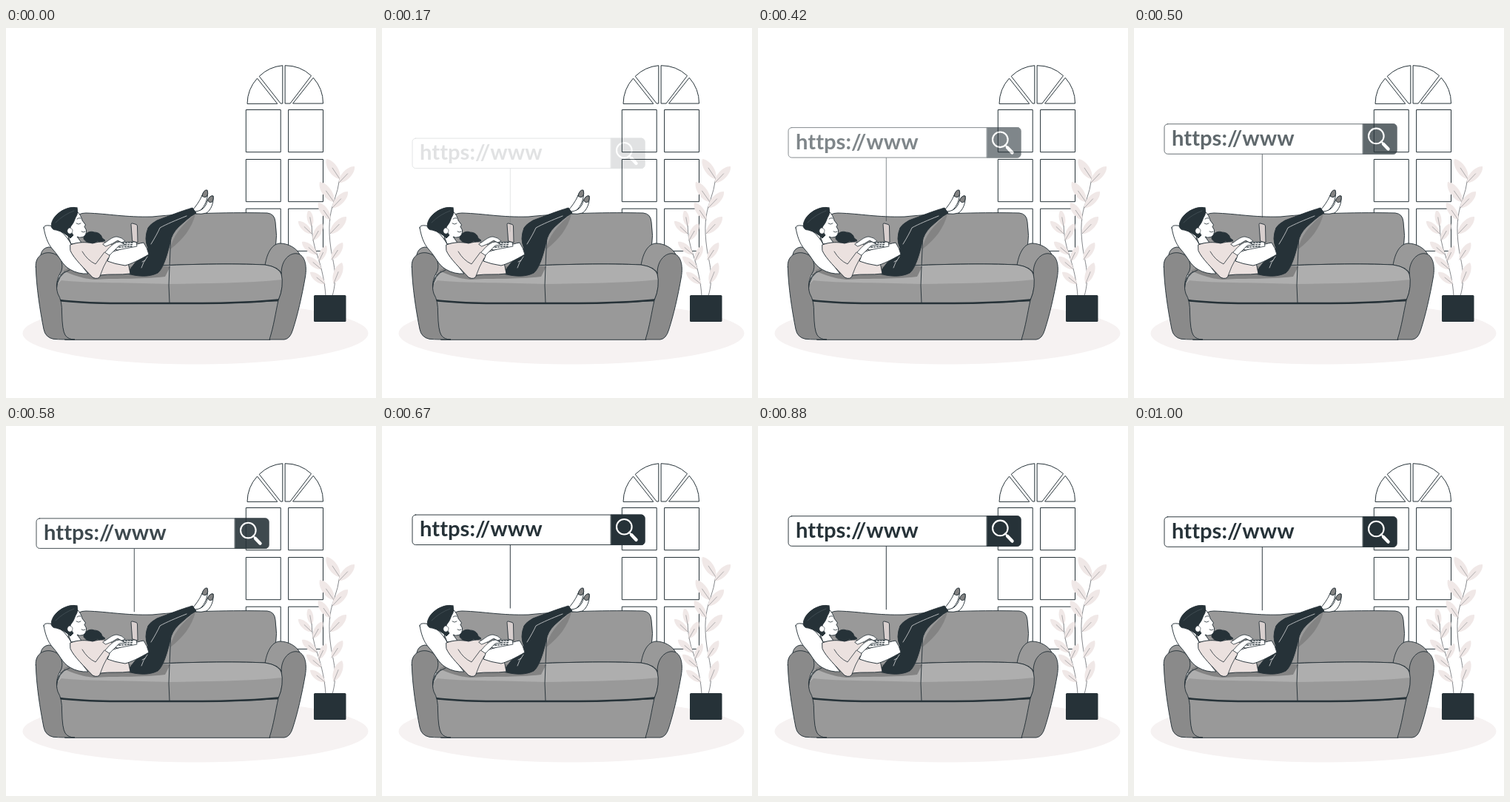
Write an HTML page with a canvas that moves like this. It is 500x500 px and loops after 1.04 s.

```html
<!DOCTYPE html>
<html lang="en">
<head>
<meta charset="utf-8">
<title>Browsing on the sofa</title>
<style>
  html, body { margin: 0; width: 100%; height: 100%; overflow: hidden; background: #fff; }
  canvas { position: absolute; left: 0; top: 0; width: 500px; height: 500px; }
</style>
</head>
<body>
<canvas id="room" width="500" height="500"></canvas>
<canvas id="bar" width="500" height="500"></canvas>
<script>
const INK = '#263238', PINK = '#ebe1df', WHITE = '#fff';
const GREY = '#999', SHADE = '#8a8a8a', LIGHT = '#aeaeae', SHADOW = '#838383';
const room = document.getElementById('room').getContext('2d');
const barCanvas = document.getElementById('bar');
const bar = barCanvas.getContext('2d');

function shape(c, d, fill, line = INK, width = 0.95) {
  const path = new Path2D(d);
  c.lineJoin = c.lineCap = 'round';
  if (fill) { c.fillStyle = fill; c.fill(path); }
  if (line) { c.strokeStyle = line; c.lineWidth = width; c.stroke(path); }
}
const draw = (...args) => shape(room, ...args);
const stroke = (d, color, width) => shape(room, d, null, color, width);

function drawFloor() {
  draw('M22.500,412.500a233.500,42 0 1 0 467,0a233.500,42 0 1 0 -467,0Z', '#f6f2f2', null);
}

function drawWindow() {
  const panes = [
    'M326,102A51.500,51.500 0 0 1 339.500,68L366.500,102Z',
    'M342.500,65A51.500,51.500 0 0 1 373.800,50.700V102H371.500Z',
    'M377.500,50.700A51.500,51.500 0 0 1 412.500,64.500L384,102H377.500Z',
    'M415.500,67.500A51.500,51.500 0 0 1 428.500,102H388Z'
  ];
  panes.forEach(d => draw(d, WHITE, INK, 1));
  for (const y of [110.5, 177.5, 244.2])
    for (const x of [324.7, 382]) draw(`M${x},${y}h46.500v57.200h-46.500Z`, WHITE, INK, 1);
}

function leaf(tx, ty, bx, by, w = 0.25) {
  const dx = bx - tx, dy = by - ty;
  const side = s => {
    const ax = tx + dx * 0.2 - dy * w * s, ay = ty + dy * 0.2 + dx * w * s;
    const cx = tx + dx * 0.8 - dy * w * s, cy = ty + dy * 0.8 + dx * w * s;
    return [ax, ay, cx, cy];
  };
  const [a, b, c, d] = side(1), [e, f, g, h] = side(-1);
  draw(`M${tx},${ty}C${a},${b} ${c},${d} ${bx},${by}C${g},${h} ${e},${f} ${tx},${ty}Z`, '#f0e8e7', null);
  stroke(`M${tx + dx * 0.45},${ty + dy * 0.45}L${bx},${by}`, '#77797d', 0.55);
}

function drawPlant() {
  stroke('M441,362C449,335 442,318 439,298C435,270 437,252 443,235Q449,218 451,203', '#66696e', 0.8);
  stroke('M432,362C431,345 427,326 421,308Q413,287 413,264', '#66696e', 0.8);
  [[433, 177, 451, 204], [471, 187, 450, 209], [424, 208, 443, 235], [462, 221, 441, 243],
   [422, 236, 438, 259], [460, 255, 438, 278], [455, 290, 440, 313], [454, 317, 443, 345]]
    .forEach(p => leaf(...p));
  [[409, 246, 413, 268], [395, 261, 413, 278], [428, 264, 415, 287], [400, 289, 420, 306],
   [433, 294, 423, 315], [406, 309, 426, 326], [411, 330, 431, 346]]
    .forEach(p => leaf(...p));
  room.fillStyle = INK;
  room.beginPath();
  room.roundRect(416, 361, 43.5, 36, 1.5);
  room.fill();
}

function drawSofa() {
  // back rest
  draw('M70,330L92,258Q97,250 108,250C140,251 160,256 198,255C245,250 310,249 353,250Q363,251 364,262Q367,280 364,300L350,323H220Z', GREY);
  draw('M222,299C225,281 237,267 256,251C252,270 238,287 222,299Z', SHADOW, null);
  stroke('M223,274Q222,300 221,322');
  // arm tops
  draw('M47,306Q49,297 58,296Q82,300 84,329L74,334Z', GREY);
  draw('M350,321C352,307 358,292 370,291C382,291 393,298 397,306L372,332Z', GREY);
  // base
  draw('M70,369H370L357,421.300H80Z', GREY);
  // seat
  draw('M68,356C67,340 75,329 86,327L190,322C240,319 310,318 350,320Q368,323 373,333Q376,350 368,368C320,373 265,372 221,372C170,373 110,373 73,368Q68,364 68,356Z', GREY);
  draw('M69,347Q73,331 86,327L190,322C240,319 310,318 350,320Q371,323 373,340C325,345 270,345 221,346C175,344 108,345 75,341Z', LIGHT, null);
  draw('M77,328C96,336 103,338 119,340C142,338 179,340 215,336L222,322H90Z', SHADOW, null);
  stroke('M86,327Q69,332 68,355M190,322C240,319 310,318 350,320Q371,323 373,334');
  stroke('M221,322L220,348L221,372');
  stroke('M73,368C110,373 170,372 221,372C270,372 325,372 368,367.500', INK, 2.6);
  // arm fronts
  draw('M40.300,323C39,309 50,302 61,304C73,306 78,317 75,328C68,340 67,349 70,359Q76,369 75.500,385Q76,409 80,415Q84,421 93,421C82,421 72,421 64,420.300Q53,418 51,407C46,382 41,350 40.300,323Z', SHADE);
  draw('M372,331C372,313 384,303 394,305C404,307 407,321 404.500,336C400,362 394,388 387.500,408Q384,420 376,421H356C362,402 364,386 368,368Q376,350 372,331Z', SHADE);
}

function drawHead() {
  draw('M105,285C104,279 113,273 119,276C126,276 129,280 130,284L134,287Q129,290 123,288Q119,293 110,290Z', INK);
  draw('M95,247C100,251 102,256 103,260L107.500,266L106,268.500L108.500,273Q109,280 104,282.500Q99,284 96,282L102,290L88,292L82,276Z', WHITE);
  draw('M96,243C85,240 70,248 64,258C59,267 61,273 68,273Q79,276 87,284L91,280Q86,275 87,269Q92,263 94,256Q98,251 96,243Z', INK);
  draw('M84,271Q81,275 85,278Q90,279 90,273Q87,268 84,271Z', WHITE, INK, 0.6);
  stroke('M95,264Q98,266.500 101,264M96,258Q98,256 101,257M102,275Q104.500,277 107,275', INK, 0.8);
  stroke('M67,263Q78,252 92,247', '#59656b', 0.5);
}

function drawLegs() {
  draw('M253,245C259,238 263,231 265,226Q268,218 272,220C274,227 270,238 265,244L258,251Z', WHITE);
  draw('M265,227Q267,218 272,219Q274,224 271,228Q268,230 265,227Z', SHADOW);
  draw('M256,248C266,247 270,241 272,234Q275,226 280,227C281,236 277,246 271,250Q264,252 257,251Z', WHITE);
  draw('M272.500,233Q275,226 280,227Q281,231 278.500,235Q275,237 272.500,233Z', SHADOW);
  draw('M164,332C171,320 184,306 192,298Q186,285 192,270Q195,265 204,260C220,254 238,247 252,243L257,250C248,255 241,262 233,269Q224,278 222,289C218,307 212,326 205,331C193,337 179,336 164,332Z', INK);
  stroke('M244,254C229,260 217,265 208,270Q204,279 196,292', '#d8dadb', 0.8);
  stroke('M191,309Q185,317 183,324M188,314L184,316', '#d8dadb', 0.8);
}

function drawBody() {
  draw('M87,293C97,289 108,289 117,291C127,288 137,288 143,293L165,317L168,332C154,334 140,332 128,334Q125,341 117,337C107,326 91,311 87,301Z', PINK);
  draw('M141,303C157,299 174,292 186,290Q191,297 193,306C181,313 169,319 161,321Q147,319 137,315Q140,309 141,303Z', WHITE);
  stroke('M138,311Q131,323 127,335M103,302Q110,314 121,319L133,303', INK, 0.8);
}

function drawLaptop() {
  draw('M144,297L151,289L176,289L177,295L151,300Z', WHITE, INK, 0.8);
  for (let row = 0; row < 3; row++)
    for (let key = 0; key < 6; key++) {
      const x = 150 + key * 3.8 - row * 0.5, y = 291 + row * 2.6 - key * 0.2;
      stroke(`M${x},${y}h2`, INK, 1.3);
    }
  draw('M169,265Q169,263.500 171,264L176,265.500Q177.500,266 177.500,268L178,290L171,288Z', '#d8cfce', INK, 0.9);
  draw('M131,292C138,288 143,282 150,282Q157,283 161,288L156,290L151,287Q144,292 135,295Z', WHITE, INK, 0.8);
  draw('M134,303Q146,288 154,289L161,293L153,294L140,307Z', WHITE, INK, 0.8);
}

function drawWoman() {
  draw('M51,270Q51,266 59,267C72,270 82,281 88,292C94,306 101,321 111,332Q98,333 86,326C75,319 74,311 63,299C56,291 53,281 51,270Z', WHITE);
  drawLegs();
  drawHead();
  drawBody();
  drawLaptop();
}

function fitFont(c, text, width) {
  const face = size => `700 ${size}px Lato, "Open Sans", sans-serif`;
  c.letterSpacing = '0.02px'; // any spacing turns ligatures off
  c.font = face(100);
  c.font = face(100 * width / c.measureText(text).width);
}

function drawBar(y) {
  const c = bar, text = 'https://www';
  const rightEnd = 'H350.500a4.500,4.500 0 0 1 4.500,4.500V36a4.500,4.500 0 0 1 -4.500,4.500';
  c.clearRect(0, 0, 500, 500);
  c.save();
  c.translate(0, y);
  shape(c, 'M173.300,40V126', null);
  shape(c, `M45.500,0${rightEnd}H45.500a4.500,4.500 0 0 1 -4.500,-4.500V4.500a4.500,4.500 0 0 1 4.500,-4.500Z`, WHITE);
  shape(c, `M309.500,0${rightEnd}H309.500Z`, INK);
  shape(c, 'M317,16.200a10.300,10.300 0 1 0 20.600,0a10.300,10.300 0 1 0 -20.600,0Z', null, WHITE, 2.1);
  shape(c, 'M334,23.500L337,26.800', null, WHITE, 2);
  shape(c, 'M337,27L343.500,33.800', null, WHITE, 4.4);
  c.fillStyle = INK;
  fitFont(c, text, 165.5);
  c.fillText(text, 51, 29.3);
  c.restore();
}

const LOOP = 1040, FIRST = 4, PEAK = 16;
// 24 steps a second, each start rounded to 10 ms
const stepStart = n => Math.round(n * 100 / 24) * 10;

function stepAt(t) {
  let n = 24;
  while (stepStart(n) > t) n--;
  return n;
}

let shown = -1;
function tick() {
  const n = stepAt(performance.now() % LOOP);
  if (n !== shown) {
    shown = n;
    const rise = Math.min(n, PEAK) - FIRST, sink = Math.max(0, n - PEAK);
    barCanvas.style.opacity = n < FIRST ? 0 : Math.min(1, 0.135 + 0.075 * rise);
    drawBar(149.1 - 2.42 * rise + 0.34 * sink);
  }
  requestAnimationFrame(tick);
}

drawFloor();
drawWindow();
drawPlant();
drawSofa();
drawWoman();
tick();
</script>
</body>
</html>
```
